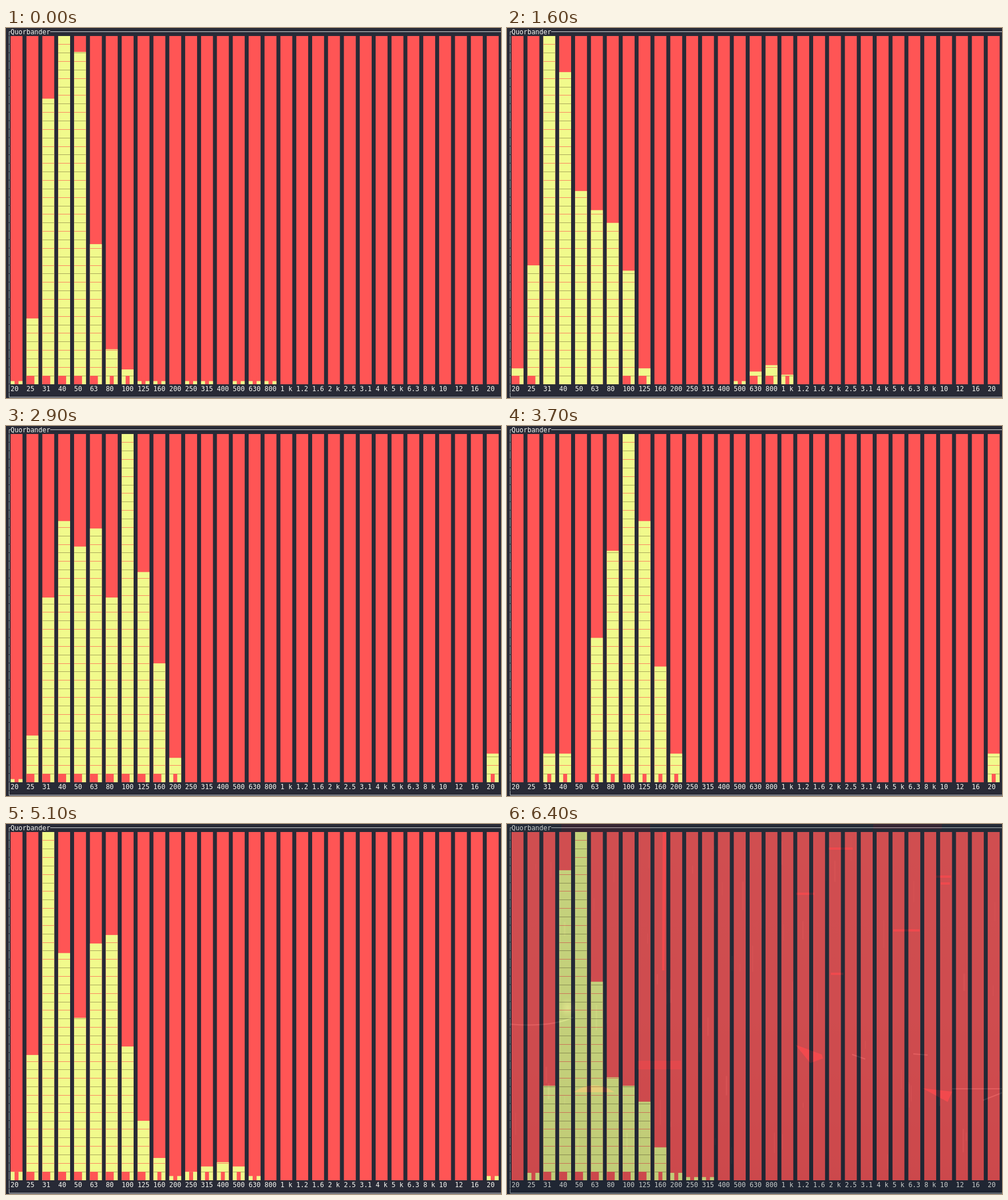
Recreate the animation shown at these times as an HTML page with a canvas. Size 865x647 px, loop 6.6 s.

```html
<!DOCTYPE html>
<html lang="en">
<head>
<meta charset="utf-8">
<title>Spectrum</title>
<style>
  html, body { margin: 0; width: 100%; height: 100%; overflow: hidden; background: #282a36; }
  canvas, svg { position: absolute; left: 0; top: 0; }
  #beam { transform: translate(80px, 83px); }
</style>
</head>
<body>
<canvas id="wall" width="865" height="647"></canvas>
<canvas id="term" width="865" height="647"></canvas>
<svg id="beam" width="9" height="19" viewBox="0 0 9 19">
  <path d="M1 2H3.5L4.5 3L5.5 2H8M4.5 3V16M1 17H3.5L4.5 16L5.5 17H8" fill="none" stroke="#111" stroke-width="3"/>
  <path d="M1.5 2H3.5L4.5 3L5.5 2H7.5M4.5 3V16M1.5 17H3.5L4.5 16L5.5 17H7.5" fill="none" stroke="#fff"/>
</svg>
<script>
const W = 865, H = 647, LOOP = 6600;
const LEFT = 8, TOP = 14, BOTTOM = 623, ROWS = 41, TICKS = ROWS * 8;
const CELL = 6.934, ROW = (BOTTOM - TOP) / ROWS;
const BG = '#282a36', RED = '#ff5555', YELLOW = '#f1fa8c', FG = '#f8f8f2';
const TITLE = 'Quorbander';
const labels = ('20,25,31,40,50,63,80,100,125,160,200,250,315,400,500,630,800,1 k,1.2,1.6,' +
  '2 k,2.5,3.1,4 k,5 k,6.3,8 k,10,12,16,20').split(',');

// Tones heard at key times, each a bell curve: band, level, width
const sounds = [
  { t: 0, tones: [[2.35, 78], [4, 77], [6.2, 6], [8.5, 1], [11.5, 1], [15, 1.2]] },
  { t: 1000, tones: [[2, 26, 1.4], [6, 42, 1.4], [15.9, 4.7, 1.4]] },
  { t: 2000, tones: [[2.3, 660], [3.05, 300], [4.05, 620], [6, 40]] },
  { t: 3700, tones: [[7.2, 12, 1.65], [5.2, 2.8, 0.6], [2.5, 0.65], [30, 0.7]] },
  { t: 5100, tones: [[2.1, 74], [3.8, 14], [5.6, 54, 1.5], [7.8, 9, 1.5], [12.9, 4, 1.9], [30, 0.7]] },
  { t: 5600, tones: [[1.46, 425, 0.74], [3, 98, 0.85], [4.8, 75], [10.5, 1.1, 1.9], [30, 1.1]] },
  { t: 6400, tones: [[3.5, 86, 1.3], [5, 22], [7.3, 23, 1.7], [11.5, 1]] }
];

function counts(tones) {
  const level = band => tones.reduce((sum, [at, amp, width = 1.1]) =>
    sum + amp * Math.exp(-(((band - at) / width) ** 2)), 0);
  return labels.map((_, i) => Math.round(level(i)));
}

const keys = sounds.map(({ t, tones }) => {
  const vals = counts(tones);
  return { t, vals, max: Math.max(...vals) };
});
keys.push({ ...keys[0], t: LOOP });

const rand = n => { const s = Math.sin(n * 12.9898) * 43758.5453; return s - Math.floor(s); };

// Counts at time t, blended between the neighbouring key times
function spectrum(t) {
  const n = keys.findIndex(k => k.t > t), a = keys[n - 1], b = keys[n];
  if (a.t === t) return a;
  const p = (t - a.t) / (b.t - a.t);
  const max = Math.round(a.max ** (1 - p) * b.max ** p);
  const mix = a.vals.map((v, i) =>
    (v / a.max * (1 - p) + b.vals[i] / b.max * p) * (0.8 + 0.4 * rand(t + i * 7)));
  const peak = Math.max(...mix);
  return { vals: mix.map(m => Math.round(m / peak * max)), max };
}

// The display refreshes every 200 ms, with one late beat and a faster stretch
function refreshTime(t) {
  const snap = (step, shift = 0) => Math.floor((t - shift) / step) * step + shift;
  if (t < 2700) return Math.min(snap(200), 2400);
  if (t < 5100) return snap(200, 100);
  return t < 6200 ? snap(100) : snap(200);
}

const term = document.getElementById('term'), g = term.getContext('2d');
const beam = document.getElementById('beam');

function box(x, y, x2, y2, color) {
  g.fillStyle = color;
  g.fillRect(x, y, x2 - x, y2 - y);
}

function drawBar(i, v, max) {
  const col = c => LEFT + (i * 4 + c) * CELL;
  box(col(0), TOP, col(3), BOTTOM, RED);
  const ticks = Math.floor(v * TICKS / max);
  if (!ticks) return;
  const top = BOTTOM - ticks * ROW / 8;
  box(col(0), top, col(3), BOTTOM, YELLOW);
  for (let r = 1; r < ROWS; r++) {
    const y = Math.floor(TOP + r * ROW);
    if (y > top) box(col(0), y, col(3), y + 1, r % 2 ? '#fb8560' : '#aaa85a');
  }
  // The count is printed red on red, and only when it is narrower than the bar
  const digits = String(v).length;
  if (digits < 3) {
    const c = digits === 1 ? 1 : 0;
    box(col(c), BOTTOM - ROW, col(c + digits), BOTTOM, RED);
  }
}

function drawTerm(t) {
  box(0, 0, W, H, BG);
  const line = '#d5d8d8', side = '#a8b4b4';
  box(5, 6, LEFT, 7, line);
  box(LEFT + TITLE.length * CELL, 6, W, 7, line);
  box(5, 645, W, 646, line);
  box(5, 6, 6, TOP - 1, side);
  for (let r = 0; r < ROWS + 2; r++) {
    const y = TOP + r * ROW;
    box(5, y, 6, Math.min(y + ROW - 1, 646), side);
  }
  g.font = '11.52px "DejaVu Sans Mono", monospace';
  g.fillStyle = FG;
  g.fillText(TITLE, LEFT, 11);
  labels.forEach((s, i) => g.fillText(s, LEFT + i * 4 * CELL, 635));
  const { vals, max } = spectrum(t);
  vals.forEach((v, i) => drawBar(i, v, max));
}

// Dim night scene that shows through the see-through terminal
function drawWall() {
  const c = document.getElementById('wall').getContext('2d');
  const sky = c.createLinearGradient(0, 0, 0, H);
  sky.addColorStop(0, '#183440');
  sky.addColorStop(0.5, '#102a38');
  sky.addColorStop(1, '#021626');
  c.fillStyle = sky;
  c.fillRect(0, 0, W, H);
  // Pale upright streaks
  c.fillStyle = '#33454f';
  for (let i = 1; i < 70; i++)
    c.fillRect(rand(i) * W, 20 + rand(i + 80) * 560, 1 + 3 * rand(i + 40) ** 3, 6 + rand(i + 160) * 44);
  const stroke = (color, width, d) => {
    c.strokeStyle = color;
    c.lineWidth = width;
    c.stroke(new Path2D(d));
  };
  const fill = (color, d) => {
    c.fillStyle = color;
    c.fill(new Path2D(d));
  };
  // Neon signs and lamps
  fill('#70182a', 'M95 0H250V14H95ZM640 0H760V9H640ZM228 414H304V429H228Z');
  fill('#c01c30', 'M272 14H278L275 256H271ZM116 469Q152 445 188 469Z' +
    'M504 386L550 403L552 410L530 418ZM726 462L778 468L770 486Z');
  stroke('#b01c30', 4, 'M505 122H537M562 43H604M675 186H721M566 262H588M750 92H776M758 104H774');
  // Wires
  stroke('#75878c', 2, 'M5 350Q75 356 116 338M778 463H865M832 483L865 470M603 403L626 411M710 402L735 404');
  const glow = c.createRadialGradient(106, 321, 1, 106, 321, 17);
  glow.addColorStop(0, '#8a8284');
  glow.addColorStop(1, '#8a828400');
  c.fillStyle = glow;
  c.fillRect(88, 303, 36, 36);
}

let shown = -1;
function tick(now) {
  const at = refreshTime(now % LOOP);
  if (at !== shown) {
    shown = at;
    drawTerm(at);
    term.style.opacity = at >= 5400 ? 0.8 : 1;
    beam.style.display = at >= 5400 && at < 6000 ? 'block' : 'none';
  }
  requestAnimationFrame(tick);
}

drawWall();
tick(performance.now());
</script>
</body>
</html>
```
